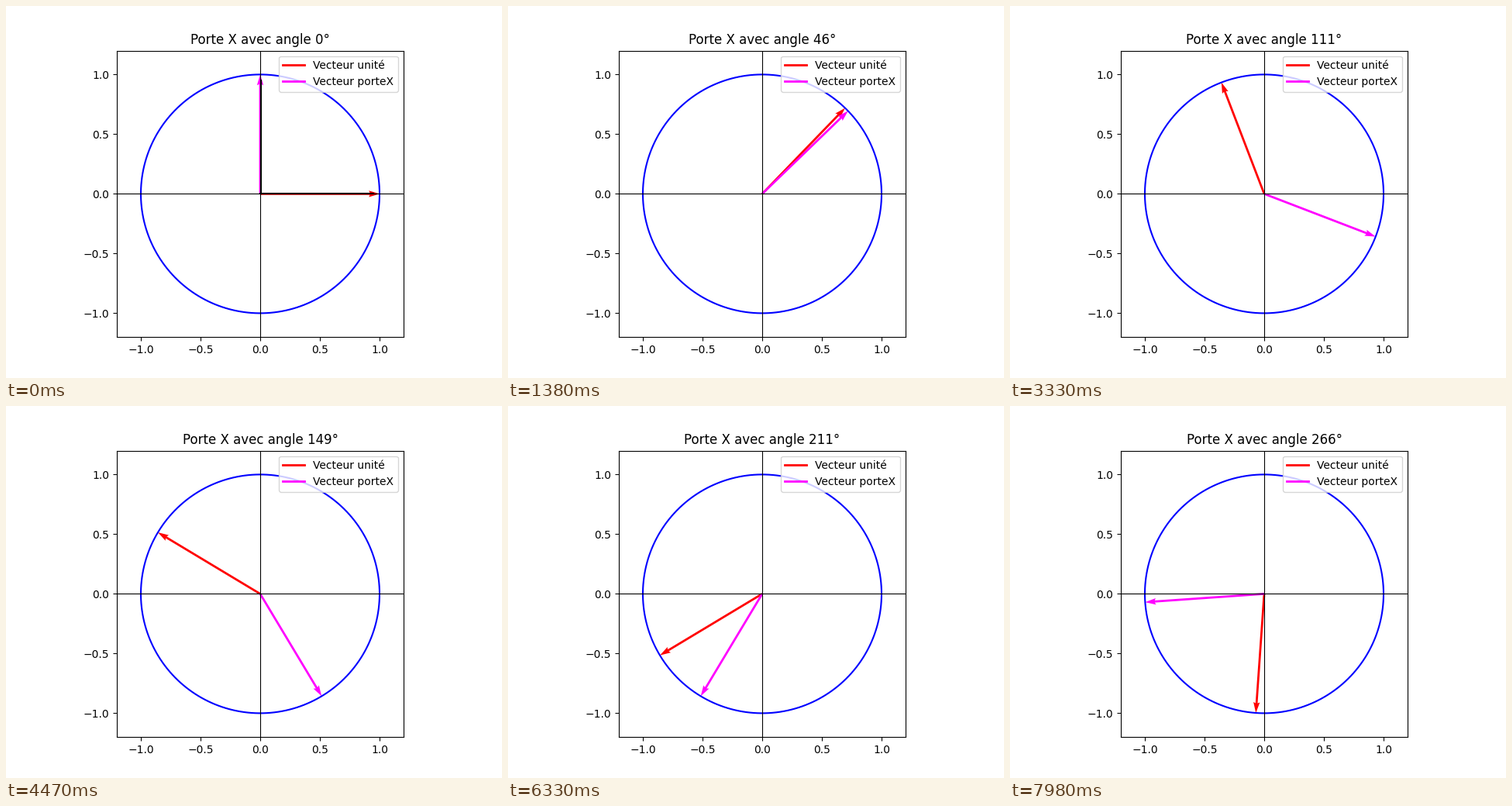
Write a matplotlib script that moves like this. It is 640 px wide and 480 px high and loops after 8000 ms.

```python
import numpy as np
import matplotlib.pyplot as plt
from matplotlib.animation import FuncAnimation
from matplotlib.lines import Line2D

LOOP_MS = 8000
FRAMES = 267  # one degree per frame

plt.rcParams["font.family"] = "DejaVu Sans"
fig, ax = plt.subplots(figsize=(6.4, 4.8), dpi=100)
ax.set_aspect("equal")
ax.set_xlim(-1.2, 1.2)
ax.set_ylim(-1.2, 1.2)

theta = np.linspace(0, 2 * np.pi, 200)
ax.plot(np.cos(theta), np.sin(theta), color="blue")
ax.axhline(0, color="black", linewidth=0.8)
ax.axvline(0, color="black", linewidth=0.8)


def arrow(u, v, color):
    return ax.quiver(0, 0, u, v, color=color,
                     angles="xy", scale_units="xy", scale=1)


unit = arrow(1, 0, "red")
gate = arrow(0, 1, "magenta")

# black shafts that mark the starting pose
start = ax.plot([0, 0.95], [0, 0], [0.005, 0.005], [0, 0.95],
                color="black", linewidth=1.5)

title = ax.set_title("")
ax.legend(
    handles=[
        Line2D([], [], color="red", linewidth=2, label="Vecteur unité"),
        Line2D([], [], color="magenta", linewidth=2, label="Vecteur porteX"),
    ],
    loc="upper right",
)


def update(deg):
    a = np.radians(deg)
    c, s = np.cos(a), np.sin(a)
    unit.set_UVC([c], [s])
    gate.set_UVC([s], [c])  # the X gate swaps both components
    for line in start:
        line.set_visible(deg == 0)
    title.set_text(f"Porte X avec angle {deg}°")
    return unit, gate, title, *start


def init():
    return update(0)


anim = FuncAnimation(fig, update, frames=FRAMES, init_func=init,
                     interval=LOOP_MS / FRAMES, repeat=True, repeat_delay=0)
plt.show()
```
